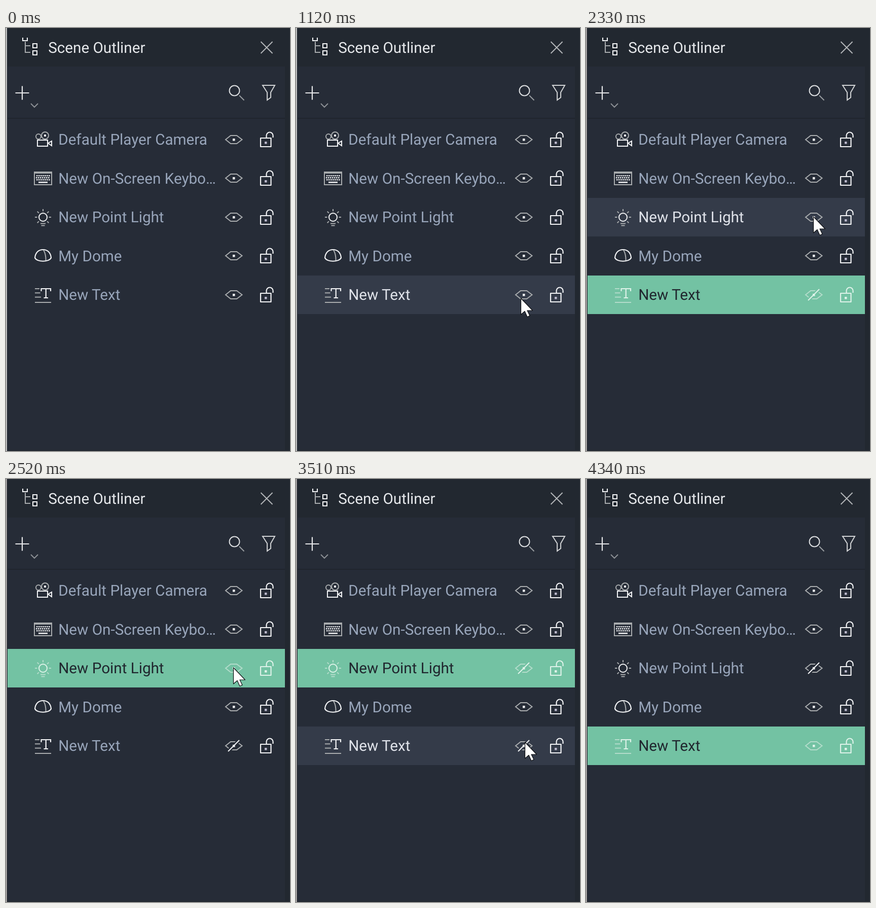
These frames come from a looping animation (560x834 px, 4540 ms). An HTML page with a canvas:

```html
<!DOCTYPE html>
<html lang="en">
<head>
<meta charset="utf-8">
<title>Scene Outliner</title>
<style>
  html, body { margin: 0; width: 100%; height: 100%; overflow: hidden; background: #262c37; }
  canvas { display: block; }
</style>
</head>
<body>
<canvas id="stage" width="560" height="834"></canvas>
<script>
const ctx = document.getElementById('stage').getContext('2d');
const LOOP = 4540;
const ROW_PITCH = 76.5;
const PANEL = '#262c37', FRAME = '#222830', GREEN = '#73c2a3';
const WHITE = '#f2f3f5', GRAY = '#a9acae', PALE = '#def2e9';

const ROWS = [
  { label: 'Default Player Camera', icon: cameraIcon },
  { label: 'New On-Screen Keybo…', icon: keyboardIcon },
  { label: 'New Point Light', icon: lightIcon },
  { label: 'My Dome', icon: domeIcon },
  { label: 'New Text', icon: textIcon }
];
const LIGHT = 2, TEXT = 4;

// The pointer enters a row, clicks it, and the row's eye toggles shortly after.
const VISITS = [
  { row: TEXT, enter: 910, click: 1330, toggle: 1490 },
  { row: LIGHT, enter: 2120, click: 2520, toggle: 2700 },
  { row: TEXT, enter: 3280, click: 3760, toggle: 4140 }
];

// Each leg eases out in a few visible hops, bowing to the right by `bow` pixels.
const LEGS = [
  { start: 220, hop: 225, hops: 4, from: [474, 675], to: [443, 532], power: 3, bow: 4 },
  { start: 1690, hop: 205, hops: 3, from: [457, 501], to: [448, 371], power: 4, bow: 15 },
  { start: 2870, hop: 200, hops: 3, from: [459, 386], to: [451, 518], power: 5, bow: 9 }
];
LEGS[1].hop = 200;
const POINTER_END = 4340;

function rect(x, y, w, h, color) {
  ctx.fillStyle = color;
  ctx.fillRect(x, y, w, h);
}

function path(d, color, width = 2) {
  ctx.strokeStyle = color;
  ctx.lineWidth = width;
  ctx.stroke(new Path2D(d));
}

function circle(x, y, r, color) {
  ctx.beginPath();
  ctx.arc(x, y, r, 0, Math.PI * 2);
  ctx.strokeStyle = color;
  ctx.lineWidth = 2;
  ctx.stroke();
}

function write(text, x, y, color) {
  ctx.font = '29.65px Roboto, sans-serif';
  ctx.textRendering = 'geometricPrecision';
  ctx.fillStyle = color;
  ctx.fillText(text, x, y);
}

// Row icons are drawn with the row's centre line at y = 0.
function cameraIcon(main, soft) {
  circle(64, -6, 5, soft);
  circle(77, -8, 7, soft);
  rect(75, -10, 4, 4, main);
  path('M62 1h20v12h-20zM83 7l7 -4v9z', main);
}

function keyboardIcon(main, soft) {
  path('M56 -12h34v25h-34z', soft);
  rect(55, -13, 36, 4, soft);
  for (let row = 0; row < 3; row++) {
    for (let i = 0; i < 7; i++) rect(60 + i * 4 - row % 2, -6 + row * 4, 2.5, 2.5, main);
  }
  rect(64, 7, 18, 2.5, main);
}

function lightIcon(main, soft) {
  circle(73, 0, 8, main);
  for (let i = 0; i < 7; i++) {
    const a = Math.PI * (0.75 + i / 4), c = Math.cos(a), s = Math.sin(a);
    path(`M${73 + 11.5 * c} ${11.5 * s}L${73 + 16 * c} ${16 * s}`, soft);
  }
  path('M68 12.5h10M69.5 16.5h7', soft);
}

function domeIcon(main, soft) {
  path('M74 -11Q79 -3 78.5 10', soft);
  path('M57 4C58 -6 64 -12 73 -12S88 -6 89 4C85 13 61 13 57 4z', main, 2.2);
}

function textIcon(main, soft) {
  for (let i = 0; i < 3; i++) path(`M57 ${-12 + i * 8.3}h${9 + i * 1.5}`, soft);
  path('M57 15h32', soft);
  path('M69.5 -7v-5h18.5v5M78.7 -12v18M74.5 6h8.5', main, 2.2);
}

function eyeIcon(main, soft, hidden, back) {
  path('M433 0l10 -8h12l10.5 8l-10.5 8h-12z', soft);
  if (hidden) {
    path('M438 11l22 -22', back, 7);
    path('M438 11l22 -22', main, 2.2);
  }
  rect(447, -2, 4.5, 4.5, main);
}

function lockIcon(main, dot) {
  ctx.lineJoin = 'round';
  path('M502 -3h20.5v17h-20.5zM513.5 -3v-5a6.5 6.5 0 0 1 13 0v4', main, 2.2);
  ctx.lineJoin = 'miter';
  rect(510, 4, 4.5, 4.5, dot);
}

function drawRow(row, index, t) {
  const visits = VISITS.filter(v => v.row === index);
  const lastClick = VISITS.filter(v => v.click <= t).pop();
  const selected = lastClick?.row === index;
  const hover = visits.some(v => v.enter <= t && t < v.click);
  const hidden = visits.filter(v => v.toggle <= t).length % 2 === 1;

  const y = 220 + index * ROW_PITCH;
  const back = selected ? GREEN : hover ? '#343b49' : PANEL;
  const main = selected ? PALE : WHITE;
  const soft = selected ? '#b3dccb' : GRAY;
  if (selected || hover) rect(3, y - 38, 547, 76, back);
  write(row.label, 103.2, Math.round(y + 10),
    selected ? '#20262e' : hover ? '#e0e3ea' : '#98a5ba');
  ctx.save();
  ctx.translate(0, Math.floor(y));
  row.icon(main, soft);
  eyeIcon(main, soft, hidden, back);
  lockIcon(main, selected ? PALE : '#b9b7cb');
  ctx.restore();
}

function drawHeader() {
  path('M33 19v6h9v-6M53 31h8v8h-8zM53 45h8v8h-8z', WHITE);
  path('M38 27v21h10M38 35h10', GRAY);
  write('Scene Outliner', 83.2, 49, '#e6e8eb');
  path('M502.5 27l23 23m0 -23l-23 23', '#b3b6b9');
}

function drawToolbar() {
  path('M18.5 128h27M32 114.5v27', '#e6e7e9', 2.2);
  path('M49 149l7 7l7 -7', '#8d9196');
  circle(450.5, 123.5, 10, '#dcdee0');
  path('M460 133l9.5 9.5', '#999da1');
  path('M506 113h24l-8 14v10l-7 5v-15z', '#d0d2d4');
}

function pointerAt(t) {
  const leg = LEGS.filter(l => l.start <= t).pop();
  if (!leg || t >= POINTER_END) return null;
  const p = Math.min(Math.floor((t - leg.start) / leg.hop) / leg.hops, 1);
  const left = (1 - p) ** leg.power;
  const [x, y] = leg.to.map((end, i) => end + (leg.from[i] - end) * left);
  return [Math.round(x + leg.bow * 6.75 * p * (1 - p) ** 2), Math.round(y)];
}

function drawPointer(t) {
  const position = pointerAt(t);
  if (!position) return;
  ctx.save();
  ctx.translate(...position);
  if (t >= 3760 && t < 3980) {
    ctx.beginPath();
    ctx.arc(0, 0, 27, 0, Math.PI * 2);
    ctx.fillStyle = 'rgba(255, 255, 0, 0.47)';
    ctx.fill();
  }
  const arrow = 'M.5 1v32l7.5 -6.5l5 11l5 -2.3l-5 -10.2h10.5z';
  ctx.fillStyle = '#fff';
  ctx.fill(new Path2D(arrow));
  ctx.lineJoin = 'round';
  path(arrow, '#0b0d10', 1.2);
  ctx.restore();
}

function draw(t) {
  rect(0, 0, 560, 834, FRAME);
  rect(3, 76, 547, 756, PANEL);
  rect(3, 177, 547, 2, '#20252e');
  rect(0, 0, 1, 834, '#c4c4c4');
  rect(1, 0, 1, 834, t < VISITS[0].click ? '#c4c4c4' : '#8a8484');
  drawHeader();
  drawToolbar();
  ROWS.forEach((row, index) => drawRow(row, index, t));
  drawPointer(t);
}

const origin = performance.now();
function tick() {
  draw((performance.now() - origin) % LOOP);
  requestAnimationFrame(tick);
}
tick();
</script>
</body>
</html>
```
